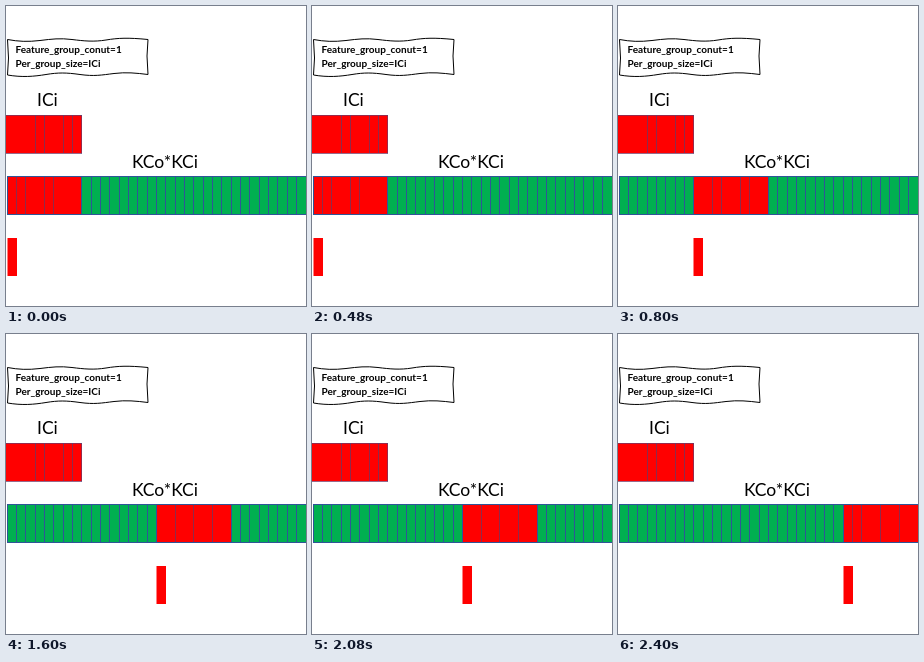
An HTML page for the animation above (3.2 s loop, 300 by 300 pixels).

```html
<!DOCTYPE html>
<html lang="en">
<head>
<meta charset="utf-8">
<style>
html, body { margin: 0; width: 100%; height: 100%; overflow: hidden; background: #fff; }
svg { display: block; width: 100vw; height: 100vh; }
text { font-family: Lato, "Open Sans", sans-serif; fill: #000; }
.note { font-size: 10px; font-weight: 700; }
.label { font-size: 17.5px; }
</style>
</head>
<body>
<svg viewBox="0 0 300 300">
  <path d="M1.5 33.5C12 35.5 22 36 34 34.5S54 32 66 33.5S88 36 100 34S122 31.5 142 33.5L141 50L142 68.5C130 67 120 66 108 67.5S88 70.5 74 68.5S52 66.5 40 68.5S16 71.5 1.5 69L2.5 52Z"
        fill="#fff" stroke="#000" stroke-width="1"/>
  <text class="note" x="9.5" y="47">Feature_group_conut=1</text>
  <text class="note" x="9.5" y="61">Per_group_size=ICi</text>
  <text class="label" x="31" y="99.5">ICi</text>
  <text class="label" x="126" y="161.5">KCo*KCi</text>
  <g id="input"></g>
  <g id="kernel"></g>
  <g id="output"></g>
</svg>
<script>
const RED = '#ff0000', GREEN = '#00b050', BLUE = '#2f5597';
const STEP = 800, GROUPS = 4, SIZE = 8, CELL = 299 / 32, LEFT = 1;
// Dividers that stay visible inside the red block at each step
const MARKS = [[1, 2, 4, 5], [2, 3, 5, 6], [2, 4, 6], [1, 2, 4, 6]];
const get = id => document.getElementById(id);
const edge = i => LEFT + i * CELL;

function rect(x, y, w, h, fill) {
  return `<rect x="${x}" y="${y}" width="${w}" height="${h}" fill="${fill}"/>`;
}

function divider(i, y, h, color = BLUE) {
  return rect(Math.floor(edge(i)), y, 1, h, color);
}

function block(first, y, marks) {
  const x = Math.floor(edge(first));
  const w = Math.floor(edge(first + SIZE)) - x;
  return rect(x, y, w, 38, RED) +
    marks.map(m => divider(first + m, y, 38, '#8f2a4a')).join('');
}

function kernel(group) {
  const first = group * SIZE;
  let out = rect(1, 170, 299, 39, GREEN);
  for (let i = 0; i <= 32; i++) out += divider(i, 170, 39);
  out += block(first, 170.5, MARKS[group]);
  out += divider(first, 170, 39) + divider(first + SIZE, 170, 39);
  return out + rect(1, 170, 299, 1, BLUE) + rect(1, 208, 299, 1, BLUE);
}

let shown = -1;
function draw(time) {
  const group = Math.floor(time / STEP) % GROUPS;
  if (group === shown) return;
  shown = group;
  get('kernel').innerHTML = kernel(group);
  get('output').innerHTML = rect(Math.floor(edge(group * SIZE)) + 0.5, 232, 9.5, 38, RED);
}

get('input').innerHTML = rect(0, 109, 76, 38.5, RED) +
  [3, 4, 6, 7].map(i => divider(i, 109, 38, '#8f2a4a')).join('') +
  rect(0, 109, 76, 0.5, BLUE) + rect(0, 147, 76, 0.5, BLUE) + rect(75.5, 109, 0.5, 38.5, BLUE);

const start = performance.now();
function tick() {
  draw(performance.now() - start);
  requestAnimationFrame(tick);
}
tick();
</script>
</body>
</html>
```
